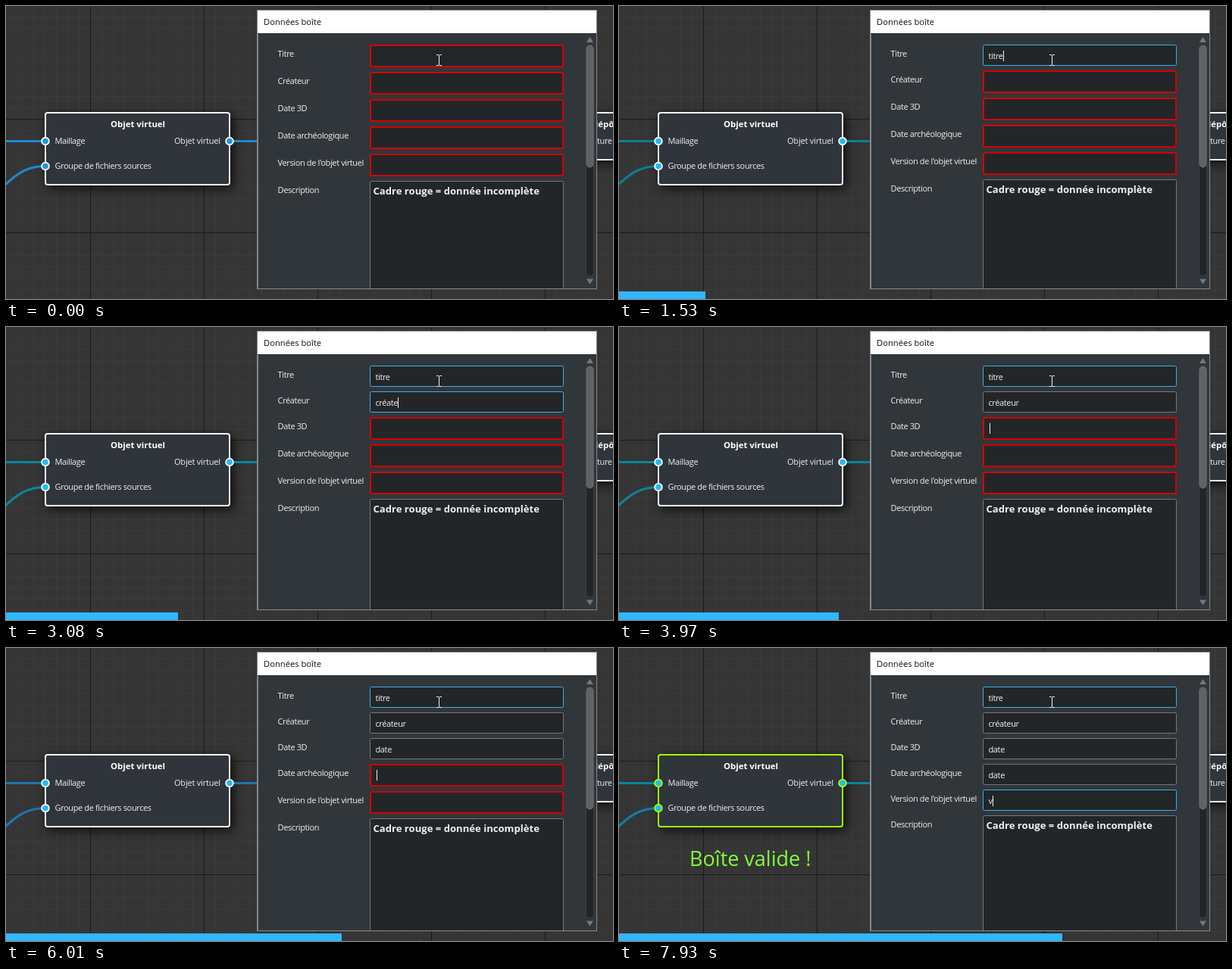
Write an HTML page with a canvas that moves like this. It is 801x387 px and loops after 8000 ms.

```html
<!DOCTYPE html>
<html lang="fr">
<head>
<meta charset="utf-8">
<title>Données boîte</title>
<style>
html, body { margin: 0; width: 100%; height: 100%; overflow: hidden; background: #353535; }
canvas { display: block; width: 801px; height: 387px; }
</style>
</head>
<body>
<canvas id="stage" width="801" height="387"></canvas>
<script>
const ctx = document.getElementById('stage').getContext('2d');
const W = 801, H = 387, LOOP = 8000;
const SANS = '"Open Sans", "Noto Sans", sans-serif';
const RED = '#d60000', BLUE = '#3daee9', GREY = '#76797c', LIGHT = '#eff0f1';

// Each field: label, typed value, time of focus, time of first key, ms per key
const fields = [
  { label: 'Titre', value: 'titre', focus: 420, start: 830, step: 160 },
  { label: 'Créateur', value: 'créateur', focus: 1840, start: 2140, step: 160 },
  { label: 'Date 3D', value: 'date', focus: 3690, start: 4680, step: 150 },
  { label: 'Date archéologique', value: 'date', focus: 5700, start: 6390, step: 150 },
  { label: "Version de l'objet virtuel", value: 'v', focus: 7240, start: 7840, step: 150 }
];
const wireColors = ['#0c7f92', '#0c859f', '#0b8598', '#1a78ac', '#1080a6', '#0b8a99'];

function text(str, x, y, { size = 11, weight = 400, color = LIGHT, gap = 0, align = 'left' } = {}) {
  ctx.font = `${weight} ${size}px ${SANS}`;
  ctx.letterSpacing = gap + 'px';
  ctx.textAlign = align;
  ctx.fillStyle = color;
  ctx.fillText(str, x, y);
}

const small = (str, x, y, gap = -0.37) => text(str, x, y, { gap });

function rect(x, y, w, h, color) {
  ctx.fillStyle = color;
  ctx.fillRect(x, y, w, h);
}

// Filled box with its border drawn inside the given edges
function box(x, y, w, h, r, fill, line, width) {
  ctx.beginPath();
  ctx.roundRect(x + width / 2, y + width / 2, w - width, h - width, r);
  ctx.fillStyle = fill;
  ctx.fill();
  ctx.strokeStyle = line;
  ctx.lineWidth = width;
  ctx.stroke();
}

function triangle(x, y, dir) {
  ctx.beginPath();
  ctx.moveTo(x - 4.5, y + 3 * dir);
  ctx.lineTo(x + 4.5, y + 3 * dir);
  ctx.lineTo(x, y - 4 * dir);
  ctx.fillStyle = GREY;
  ctx.fill();
}

function grid(step, x0, y0, color) {
  for (let x = x0; x < W; x += step) rect(x, 0, 1, H, color);
  for (let y = y0; y < H; y += step) rect(0, y, W, 1, color);
}

function node(x, y, w, h, line) {
  ctx.save();
  ctx.shadowColor = 'rgba(0,0,0,.75)';
  ctx.shadowBlur = 14;
  ctx.shadowOffsetX = ctx.shadowOffsetY = 4;
  ctx.beginPath();
  ctx.roundRect(x, y, w, h, 4);
  ctx.fillStyle = '#2f353a';
  ctx.fill();
  ctx.restore();
  box(x, y, w, h, 3, '#2f353a', line, 2);
}

function port(x, y, fill, line) {
  ctx.beginPath();
  ctx.arc(x, y, 4.8, 0, Math.PI * 2);
  ctx.fillStyle = fill;
  ctx.fill();
  ctx.strokeStyle = line;
  ctx.lineWidth = 2;
  ctx.stroke();
}

function scene(wire, dot, valid) {
  rect(0, 0, W, H, '#353535');
  grid(15, 6, 14, '#3b3b3b');
  grid(150, 111, 149, '#1b1b1b');

  const edge = valid ? '#a0ff00' : '#f4f4f4';
  node(51, 140, 245, 97, edge);
  node(700, 140, 160, 64, '#f4f4f4');

  ctx.strokeStyle = wire;
  ctx.lineWidth = 3;
  ctx.beginPath();
  ctx.moveTo(0, 178.5);
  ctx.lineTo(52, 178.5);
  ctx.moveTo(295, 178.5);
  ctx.lineTo(340, 178.5);
  ctx.moveTo(-2, 237);
  ctx.bezierCurveTo(14, 222, 27, 211.5, 52, 211.5);
  ctx.stroke();
  for (const [x, y] of [[52, 178.5], [52, 211.5], [295, 178.5]]) port(x, y, dot, edge);

  text('Objet virtuel', 174, 160, { size: 11.4, weight: 700, color: '#fff', align: 'center' });
  small('Maillage', 64.5, 182);
  small('Groupe de fichiers sources', 64.5, 215);
  small('Objet virtuel', 222, 182, -0.2);
  text('dépôt', 774, 160, { size: 11.4, weight: 700, color: '#fff' });
  small('ture', 780, 182);
  if (valid) text('Boîte valide !', 93, 288, { size: 27, color: '#82ff3c' });
}

function dialog() {
  rect(331, 5, 449, 369, '#85888a');
  rect(332, 6, 447, 30, '#fff');
  rect(332, 36, 447, 1, '#25282b');
  rect(333, 37, 446, 336, '#31363b');
  text('Données boîte', 340, 25, { size: 11.2, color: '#111' });
  box(765, 51, 11, 306, 5, '#222528', '#3a3e42', 1);
  box(765.5, 51.5, 10, 162, 4.5, '#606366', '#6a6d70', 1);
  triangle(770.5, 45, 1);
  triangle(770.5, 363.5, -1);
}

function form(t, current) {
  ctx.save();
  ctx.beginPath();
  ctx.rect(333, 37, 446, 336);
  ctx.clip();
  let top = 51;
  fields.forEach((f, i) => {
    const keys = t < f.start ? 0 : Math.min(f.value.length, 1 + Math.floor((t - f.start) / f.step));
    const str = f.value.slice(0, keys);
    const active = i === current;
    const h = keys ? 28 : 30;
    const line = !keys ? RED : active || i === 0 ? BLUE : GREY;
    box(480, top, 256, h, 2, '#232629', line, keys ? 1 : 2);
    small(f.label, 358.5, top + 16);
    small(str, 487.5, top + 19);
    const last = keys ? f.start + (keys - 1) * f.step : f.focus;
    if (active && (t - last) % 1060 < 530) {
      const x = keys ? Math.round(487.5 + ctx.measureText(str).width) : 489;
      rect(x, top + 8, 1, 14, LIGHT);
    }
    top += h + 6;
  });
  small('Description', 358.5, top + 16);
  box(480, top, 256, 200, 2, '#232629', GREY, 1);
  text('Cadre rouge = donnée incomplète', 484.5, top + 18, { size: 13.1, weight: 700 });
  ctx.restore();
}

function pointer() {
  rect(571, 65, 1, 13, '#f4f4f4');
  for (const y of [64, 78]) {
    rect(568, y, 3, 1, '#f4f4f4');
    rect(572, y, 3, 1, '#f4f4f4');
  }
}

function draw(t) {
  const tick = Math.min(103, Math.floor((t + 13) / 77));
  const current = fields.findLastIndex(f => t >= f.focus);
  const wire = tick ? wireColors[Math.max(0, current)] : '#1e88d0';
  const dot = tick ? '#25baf2' : '#2196d3';
  scene(wire, dot, t >= fields[4].start);
  dialog();
  form(t, current);
  pointer();
  rect(0, 377, Math.round(tick * 5.68), 10, '#30b8ff');
}

const begin = performance.now();
function frame() {
  draw((performance.now() - begin) % LOOP);
  requestAnimationFrame(frame);
}
frame();
</script>
</body>
</html>
```
